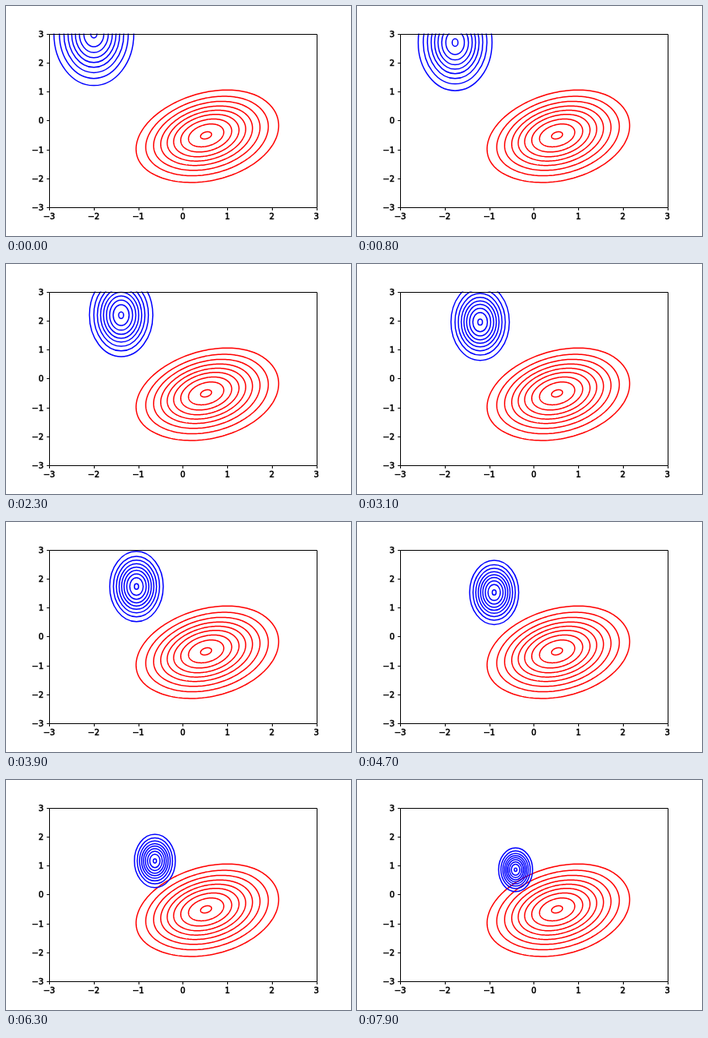
Animation, 432 px wide and 288 px high, one loop 8000 ms. Source, as an HTML page:

```html
<!DOCTYPE html>
<html lang="en">
<head>
<meta charset="utf-8">
<title>Contours</title>
<style>
  html, body { margin: 0; width: 100%; height: 100%; overflow: hidden; background: #fff; }
  svg { display: block; width: 432px; height: 288px; }
  #fixed, #moving { fill: none; stroke-width: 1.5; }
  #fixed { stroke: #f00; }
  #moving { stroke: #00f; }
  #axes { fill: none; stroke: #000; stroke-width: 1; }
  text { font: 10px "DejaVu Sans", sans-serif; stroke: #000; stroke-width: 0.55; }
</style>
</head>
<body>
<svg viewBox="0 0 432 288">
  <clipPath id="plot"><rect x="54" y="34.56" width="334.8" height="217.44"/></clipPath>
  <g clip-path="url(#plot)">
    <g id="fixed"></g>
    <g id="moving"></g>
  </g>
  <path id="axes"/>
  <g id="labels"></g>
</svg>
<script>
  const NS = "http://www.w3.org/2000/svg";
  const STEP = 100, STEPS = 80;
  const RINGS = [1, 0.862, 0.75, 0.648, 0.555, 0.463, 0.362, 0.251, 0.079];
  const byId = id => document.getElementById(id);

  function add(parent, tag, attrs, text) {
    const el = document.createElementNS(NS, tag);
    for (const k in attrs) el.setAttribute(k, attrs[k]);
    if (text) el.textContent = text;
    parent.append(el);
    return el;
  }

  // Axes: frame, ticks and labels, snapped to whole pixels
  const snap = v => Math.floor(v + 0.5) + 0.5;
  let path = "M54.5 35.5H389.5V252.5H54.5Z";
  for (let v = -3; v <= 3; v++) {
    const x = 221.4 + 55.8 * v, y = 143.28 - 36.24 * v;
    const label = String(v).replace("-", "\u2212");
    path += `M${snap(x)} 252.5v3.5M54.5 ${snap(y)}h-3.5`;
    add(byId("labels"), "text", { x, y: 267, "text-anchor": "middle" }, label);
    add(byId("labels"), "text", { x: 47, y: Math.round(y + 4), "text-anchor": "end" }, label);
  }
  byId("axes").setAttribute("d", path);

  // Correlated density, skewed: the lower right half of each ring bulges
  const RHO = 0.3, SKEW = 0.105;
  function skewedRing(r) {
    const points = [];
    for (let i = 0; i < 180; i++) {
      const t = i * Math.PI / 90;
      const major = Math.sqrt((1 + RHO) / 2) * Math.cos(t);
      const bulge = Math.sin(t) > 0 ? 1 + SKEW * r : 1;
      const minor = Math.sqrt((1 - RHO) / 2) * Math.sin(t) * bulge;
      const x = 250.5 + 87.6 * r * (major + minor);
      const y = 162 + 56.8 * r * (minor - major);
      points.push(x.toFixed(2) + " " + y.toFixed(2));
    }
    return "M" + points.join("L") + "Z";
  }
  for (const r of RINGS) add(byId("fixed"), "path", { d: skewedRing(r) });

  // Gaussian that shrinks while it approaches the fixed density
  const rings = RINGS.map(() => add(byId("moving"), "ellipse", {}));
  const decay = (start, a, b, n) => start * Math.exp(-(a + b * n) * n);

  function draw(n) {
    const cx = 250.7 - decay(140.7, 0.0119, 0.0000085, n);
    const cy = 162.3 - decay(127.5, 0.0111, 0.0000097, n);
    const w = decay(50, 0.0097, 0.0000142, n);
    const h = decay(64.8, 0.009, 0.0000245, n);
    rings.forEach((ring, i) => {
      const shape = { cx, cy, rx: w * RINGS[i], ry: h * RINGS[i] };
      for (const k in shape) ring.setAttribute(k, shape[k]);
    });
  }

  const start = performance.now();
  function tick() {
    draw(Math.floor((performance.now() - start) / STEP) % STEPS);
    requestAnimationFrame(tick);
  }
  tick();
</script>
</body>
</html>
```
